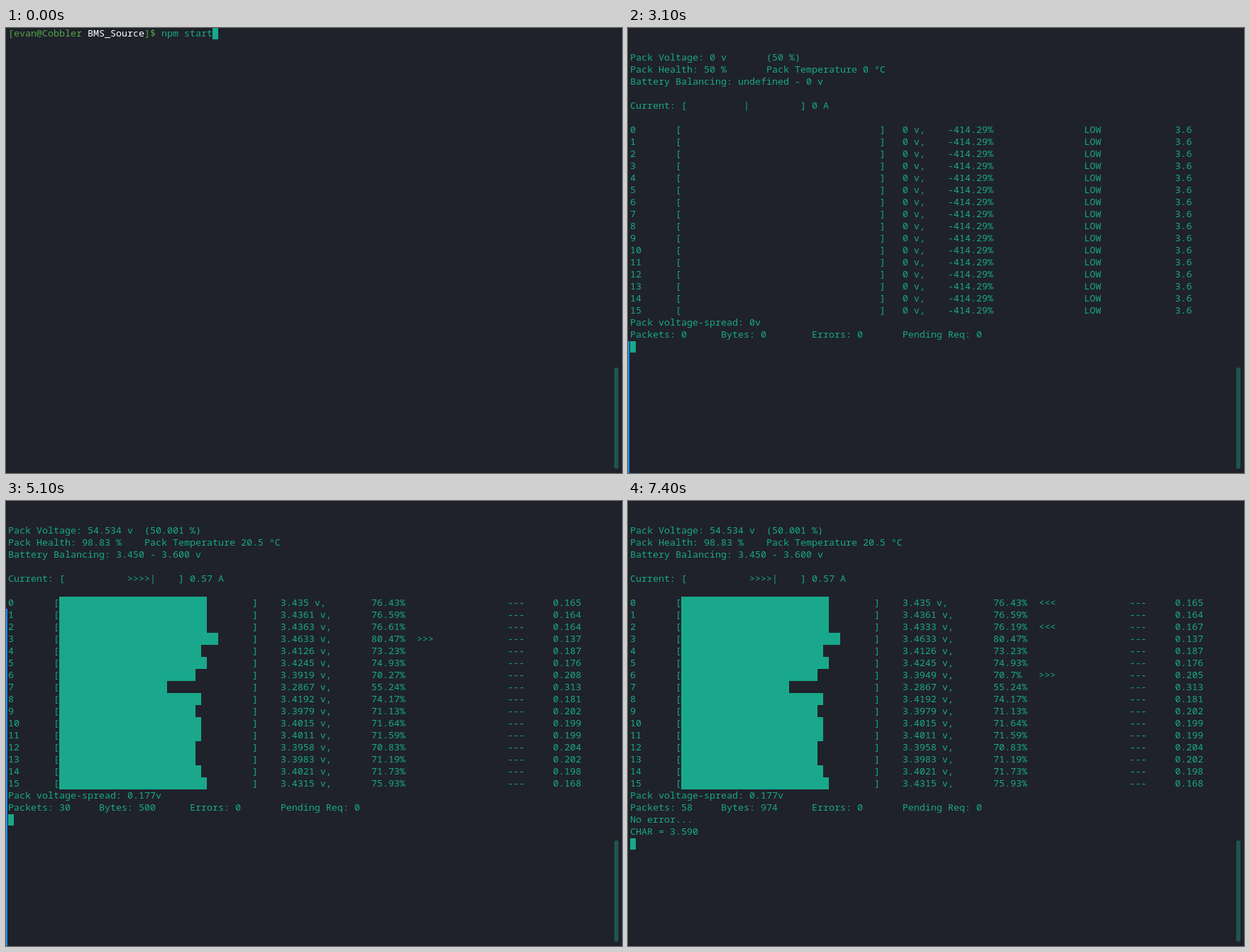
Recreate the animation shown at these times as an HTML page. Size 868 px wide and 628 px high, loop 8 s.

```html
<!DOCTYPE html>
<html lang="en">
<head>
<meta charset="utf-8">
<title>Battery monitor</title>
<style>
html, body { margin: 0; width: 100%; height: 100%; overflow: hidden; background: #1f222a; }
pre {
  position: absolute; left: 3px; top: -1px; margin: 0;
  font: 13.3333px/17px "Noto Sans Mono", monospace;
  color: #19a88c; tab-size: 8; font-variant-ligatures: none;
}
i, u { display: inline-block; vertical-align: top; background: #19a88c; }
i { height: 17px; }
u { width: 8px; height: 16px; margin-top: 1px; }
em { font-style: normal; color: #55a549; }
b { font-weight: normal; color: #fff; }
#bar { position: absolute; left: 857px; top: 479px; width: 6px; height: 143px; border-radius: 3px; background: #1f564f; }
#edge { position: absolute; left: 0; bottom: 0; width: 2px; background: #1d8ee6; }
</style>
</head>
<body>
<pre id="term"></pre>
<div id="bar"></div>
<div id="edge"></div>
<script>
const LOOP = 8000;
const CURSOR = '<u></u>';

const prompt = '<em>[evan@Cobbler</em> <b>BMS_Source</b><em>]$</em> npm start';
// [time, text added to the shell]
const boot = [
  [0, prompt],
  [1300, '\n'],
  [1800, '\n> bms_source@1.0.0 start /home/evan/Desktop/BMS_Source\n> node app.js\n\n'],
  [2100, 'Listening on port 3000\n'],
  [2200, 'Port open!\n']
];

const empty = Array(16).fill(0);
const first = [
  3.435, 3.4361, 3.4363, 3.4603, 3.4126, 3.42449, 3.3919, 3.2867,
  3.4192, 3.3979, 3.40149, 3.4011, 3.3958, 3.3983, 3.4021, 3.43151
];
const change = (cells, part) => Object.assign([...cells], part);
const second = change(first, { 3: 3.4633 });
const third = change(second, { 0: 3.438 });
const fourth = change(third, { 0: 3.435, 2: 3.4333, 6: 3.3949 });

const ok = 'No error...\n', char = 'CHAR = 3.590\n';
const pages = [
  { at: 3100, cells: empty, charge: 50, amps: 0, packets: 0, bytes: 0, log: [[3400, ok + char]] },
  { at: 4000, cells: first, charge: 50.077, amps: 0.59, packets: 15, bytes: 250, log: [[4300, ok], [4400, char]] },
  { at: 5100, cells: second, charge: 50.001, amps: 0.57, packets: 30, bytes: 500,
    log: [[5400, ok], [5800, 'Query timeout -> CHAR?\n']] },
  { at: 6100, cells: third, charge: 50.001, amps: 0.57, packets: 44, bytes: 734,
    log: [[6600, 'Query timeout -> CMIN 2.9\n'], [6700, ok], [6800, char]] },
  { at: 7100, cells: fourth, charge: 50.001, amps: 0.57, packets: 58, bytes: 974, log: [[7400, ok + char]] }
];

// [from, to, top] of the blue edge line
const edges = [
  [3100, 3400, 442], [4000, 4300, 152], [5100, 5400, 152],
  [6100, 6400, 152], [6600, 6700, 152], [7100, 7400, 135]
];

const round = (x, digits) => +x.toFixed(digits);
const typed = (list, t) => list.filter(e => e[0] <= t).map(e => e[1]).join('');

function cellRow(v, n, before) {
  const pct = (v - 2.9) / 0.7 * 100;
  const fill = Math.max(0, Math.floor(pct * 0.35));
  const gauge = `<i style="width:${fill * 8}px"></i>` + ' '.repeat((v ? 34 : 35) - fill);
  const trend = v > before ? '&gt;&gt;&gt;' : v < before ? '&lt;&lt;&lt;' : '';
  const status = v ? '\t---' : 'LOW\t';
  return `${n}\t[${gauge}]\t${round(v, 4)} v,\t${round(pct, 2)}%\t${trend}\t${status}\t${round(3.6 - v, 3)}\n`;
}

function dashboard(page, before) {
  const { cells, charge, amps, packets, bytes } = page;
  const live = packets > 0;
  const sum = cells.reduce((a, v) => a + v, 0);
  const spread = Math.max(...cells) - Math.min(...cells);
  const flow = live ? ' '.repeat(11) + '&gt;&gt;&gt;&gt;|    ' : ' '.repeat(10) + '|' + ' '.repeat(9);
  return `\n\nPack Voltage: ${round(sum, 3)} v\t(${charge} %)\n` +
    `Pack Health: ${live ? 98.83 : 50} %\tPack Temperature ${live ? 20.5 : 0} °C\n` +
    `Battery Balancing: ${live ? '3.450 - 3.600' : 'undefined - 0'} v\n\n` +
    `Current: [${flow}] ${amps} A\n\n` +
    cells.map((v, n) => cellRow(v, n, before[n])).join('') +
    `Pack voltage-spread: ${round(spread, 3)}v\n` +
    `Packets: ${packets}\tBytes: ${bytes}\tErrors: 0\tPending Req: 0\n`;
}

function screen(t) {
  const n = pages.filter(p => p.at <= t).length - 1;
  if (n < 0) return typed(boot, t) + CURSOR;
  const before = n ? pages[n - 1].cells : empty;
  return dashboard(pages[n], before) + typed(pages[n].log, t) + CURSOR;
}

const term = document.getElementById('term');
const edge = document.getElementById('edge');
let shown;

function draw(now) {
  const t = now % LOOP;
  const html = screen(t);
  if (html !== shown) term.innerHTML = shown = html;
  const line = edges.find(e => e[0] <= t && t < e[1]);
  edge.style.height = (line ? 628 - line[2] : 0) + 'px';
  requestAnimationFrame(draw);
}
draw(performance.now());
</script>
</body>
</html>
```
